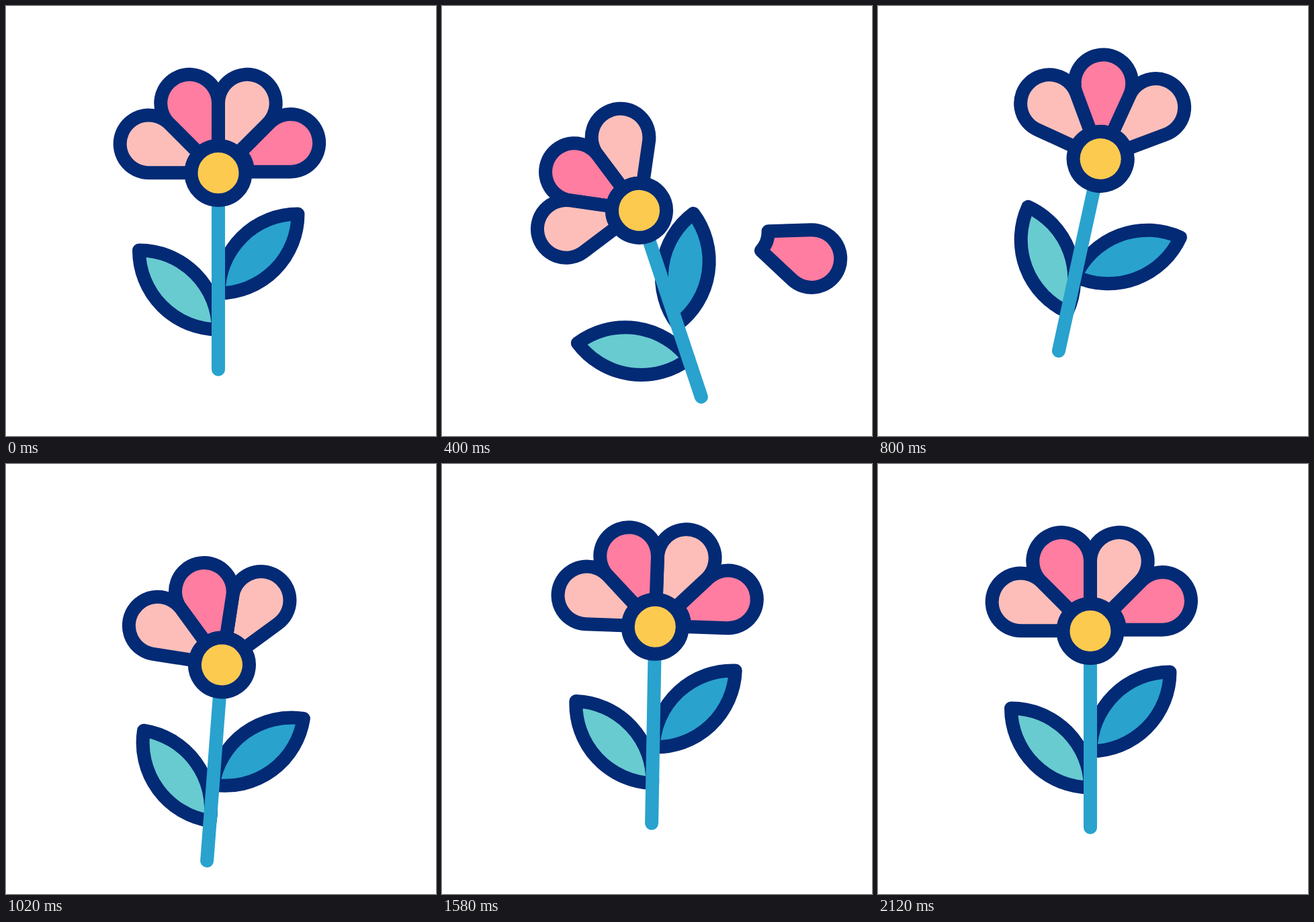
An HTML page that plays this animation: 640 px wide and 640 px high, repeating every 2.4 s.

```html
<!DOCTYPE html>
<html lang="en">
<head>
<meta charset="utf-8">
<title>Flower</title>
<style>
  html, body { margin: 0; width: 100%; height: 100%; overflow: hidden; background: #fff; }
  svg { display: block; width: 100%; height: 100%; }
  .line { stroke: #032a75; stroke-width: 20; stroke-linejoin: round; }
  .pink { fill: #fe7da0; }
  .peach { fill: #fdbeb9; }
  .teal { fill: #68cbd0; }
  .blue { fill: #29a2ce; }
  .yellow { fill: #fdca50; }
</style>
</head>
<body>
<svg viewBox="0 0 640 640">
  <defs>
    <path id="petal" vector-effect="non-scaling-stroke"
      d="M-15.3-37A40 40 0 0 1 15.3-37L39.6-95.6A42.86 42.86 0 1 0-39.6-95.6Z"/>
  </defs>
  <use id="falling" href="#petal" class="line pink"/>
  <g id="flower">
    <path id="leftLeaf" class="line teal" d="M0 0A118 118 0 0 0-118-118A118 118 0 0 0 0 0Z"/>
    <path id="rightLeaf" class="line blue" d="M0 0A118 118 0 0 1 118-118A118 118 0 0 1 0 0Z"/>
    <path d="M316 250V541" stroke="#29a2ce" stroke-width="20" stroke-linecap="round"/>
    <g id="head">
      <use id="growing" href="#petal" class="line pink"/>
      <use href="#petal" class="line peach" transform="rotate(22.5)"/>
      <use href="#petal" class="line pink" transform="rotate(-22.5)"/>
      <use href="#petal" class="line peach" transform="rotate(-67.5)"/>
      <circle cy=".3" r="40.5" class="line yellow"/>
    </g>
  </g>
</svg>
<script>
const LOOP = 2400;
const REGROW = 1060;
const PETAL_ANGLE = 67.5;

// [time, value] pairs, eased in and out between neighbours
const lean = [[0, 0], [427, -18.6], [775, 12.4], [1355, -8.6], [1700, 4.5], [2120, 0]];
const lift = [[0, 0], [370, 54], [713, -36], [1060, 53], [1420, -20], [1800, 16], [2120, 0]];
const growth = [[REGROW, 0], [1395, 1]];
const fallX = [[0, 423.3], [432, 552], [865, 517]];
const fallTurn = [[0, PETAL_ANGLE], [850, 162]];

const el = id => document.getElementById(id);
const place = (id, transform) => el(id).setAttribute('transform', transform);
const show = (id, visible) => el(id).setAttribute('visibility', visible ? 'visible' : 'hidden');

function track(keys, t) {
  if (t <= keys[0][0]) return keys[0][1];
  for (let i = 1; i < keys.length; i++) {
    const [t0, v0] = keys[i - 1], [t1, v1] = keys[i];
    if (t < t1) return v0 + (v1 - v0) * (1 - Math.cos(Math.PI * (t - t0) / (t1 - t0))) / 2;
  }
  return keys[keys.length - 1][1];
}

function draw(t) {
  const angle = track(lean, t);
  place('flower', `translate(0 ${track(lift, t)}) rotate(${angle} 316 320)`);
  place('head', `translate(316 248.2) rotate(${angle})`);
  place('leftLeaf', `translate(316 481.5) rotate(${angle})`);
  place('rightLeaf', `translate(316.5 427.5) rotate(${angle})`);

  const grown = t >= REGROW;
  show('falling', !grown);
  show('growing', grown);
  if (grown) {
    const size = Math.max(track(growth, t), 0.001);
    place('growing', `rotate(${PETAL_ANGLE}) translate(0 ${-4 * size}) scale(${size})`);
  } else {
    const y = 203.8 + 0.0233 * t + 0.001013 * t * t;
    place('falling', `translate(${track(fallX, t)} ${y}) rotate(${track(fallTurn, t)}) translate(0 112)`);
  }
}

const start = performance.now();
function tick() {
  draw((performance.now() - start) % LOOP);
  requestAnimationFrame(tick);
}
draw(0);
requestAnimationFrame(tick);
</script>
</body>
</html>
```
